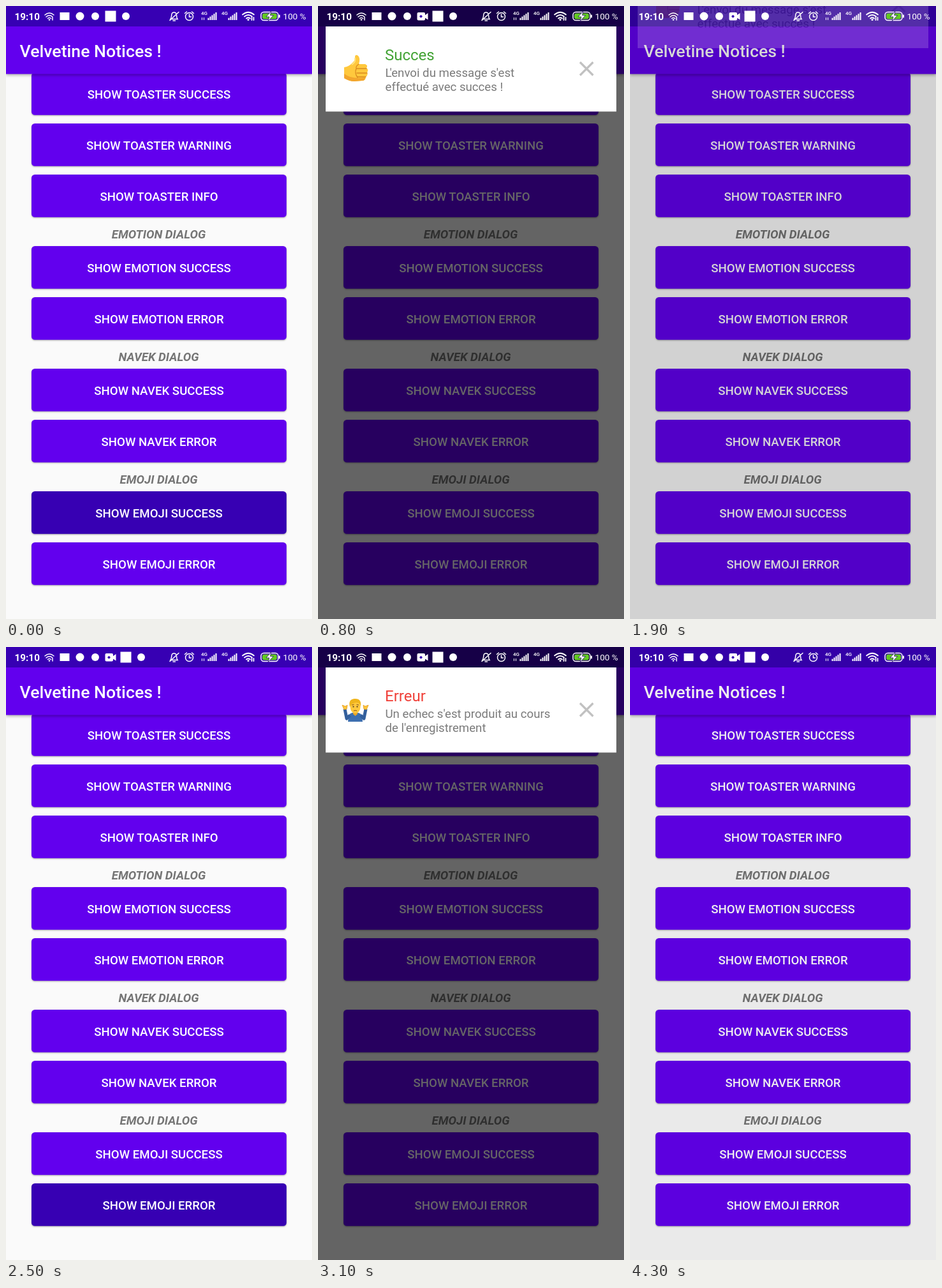
Write an HTML page that moves like this. It is 480 px wide and 960 px high and loops after 4400 ms.

```html
<!DOCTYPE html>
<html lang="en">
<head>
<meta charset="utf-8">
<title>Dialogs</title>
<style>
  html, body { margin: 0; width: 100%; height: 100%; overflow: hidden; background: #fafafa; }
  svg { display: block; width: 480px; height: 960px; font-family: Roboto, sans-serif; }
  .btn rect { filter: drop-shadow(0 1.5px 1.3px rgba(0, 0, 0, .32)); }
  .btn text { fill: #fff; font-size: 18.67px; font-weight: 500; text-anchor: middle; }
  .head { fill: #757575; font-size: 18.67px; font-weight: 700; font-style: italic; text-anchor: middle; }
  .bar { filter: drop-shadow(0 2px 2px rgba(0, 0, 0, .3)); }
  .title { fill: #fff; font-size: 26.67px; font-weight: 500; }
  .name { font-size: 24px; }
  .msg { fill: #7b7b7b; font-size: 18.67px; }
  .line { fill: none; stroke: #fff; stroke-width: 1.5; stroke-linecap: round; }
</style>
</head>
<body>
<svg viewBox="0 0 480 960" xmlns="http://www.w3.org/2000/svg">
  <rect width="480" height="960" fill="#fafafa"/>
  <g id="list"></g>
  <rect class="bar" y="32" width="480" height="74.5" fill="#6200ee"/>
  <rect width="480" height="32" fill="#3700b3"/>
  <text class="title" x="21.5" y="80">Velvetine Notices !</text>
  <rect id="dim" width="480" height="960" opacity="0"/>

  <g id="ok" visibility="hidden">
    <rect x="12" y="32" width="456" height="133.3" fill="#fff"/>
    <g stroke-linejoin="round">
      <path d="M41 96Q48 95 53 90Q59 85 58 79Q59 75 63 78Q67 82 64 91L74 91Q79 93 76 97Q80 100 77 104Q79 108 75 111Q75 117 69 117L57 118Q49 118 41 113Z" fill="#ffc83d"/>
      <path d="M41 106Q52 115 74 112Q74 117 69 117L57 118Q49 118 41 113Z" fill="#f2a52d"/>
      <path d="M64 91Q59 94 60 98M61 98H76M61 105H77M62 111H75M60 98Q57 105 62 112" fill="none" stroke="#d98a1f" stroke-width="1.3" stroke-linecap="round"/>
      <path d="M58 81Q60 87 53 92" fill="none" stroke="#ffe27c" stroke-width="2"/>
    </g>
    <text class="name" x="105" y="85" fill="#43a335">Succes</text>
    <text class="msg" x="105.5" y="111">L'envoi du message s'est</text>
    <text class="msg" x="105.5" y="133">effectué avec succes !</text>
    <path d="M411 88L431.500 108.500M431.500 88L411 108.500" stroke="#c1c1c1" stroke-width="3.2"/>
  </g>

  <g id="bad" visibility="hidden">
    <rect x="12" y="32" width="456" height="133.300" fill="#fff"/>
    <path d="M47 117L48 107Q52 102 58 103Q65 102 69 107L70 117Z" fill="#3d6fb0"/>
    <path d="M50 107L45 112L42 97M67 107L72 112L75 97" fill="none" stroke="#335f9c" stroke-width="5" stroke-linejoin="round"/>
    <path d="M38 91L43 93L46 91L45 97L41 98ZM79 91L74 93L71 91L72 97L76 98Z" fill="#ffc83d" stroke="#e9a528" stroke-width="1" stroke-linejoin="round"/>
    <path d="M55 101H62V105L58.500 108L55 105Z" fill="#e9a528"/>
    <ellipse cx="58.500" cy="94" rx="8" ry="10" fill="#ffc83d"/>
    <path d="M50 94Q47 82 57 81Q69 80 67 94Q66 87 61 87Q53 87 50 94Z" fill="#f0b51c"/>
    <path d="M53 91L56.500 90M60.500 90L64 91" stroke="#8a5a1c" stroke-width="1.2"/>
    <circle cx="55.500" cy="93.500" r="1.100" fill="#4b3522"/>
    <circle cx="61.500" cy="93.500" r="1.100" fill="#4b3522"/>
    <path d="M56 100Q58.500 98.500 61 100" fill="none" stroke="#8a5a1c" stroke-width="1.200"/>
    <text class="name" x="105" y="85" fill="#f0413a">Erreur</text>
    <text class="msg" x="105.500" y="111">Un echec s'est produit au cours</text>
    <text class="msg" x="105.500" y="133">de l'enregistrement</text>
    <path d="M411 88L431.500 108.500M431.500 88L411 108.500" stroke="#c1c1c1" stroke-width="3.200"/>
  </g>

  <g fill="#fff">
    <text x="13.500" y="22" font-size="15.300" font-weight="700">19:10</text>
    <g class="line">
      <path d="M61 14Q68 8 75 14M63 17Q68 12.500 73 17M65.500 19.500Q68 17 70.500 19.500M73 18V22"/>
    </g>
    <circle cx="68" cy="21.500" r="1.300"/>
    <rect x="84.500" y="10" width="15" height="12"/>
    <circle cx="116" cy="16" r="6.500"/>
    <circle cx="140" cy="16" r="6"/>
    <g id="cam" opacity="0">
      <rect x="155.500" y="10" width="12.500" height="12.500" rx="2"/>
      <path d="M167 15L172.500 11V21.500L167 18Z"/>
      <circle cx="161.500" cy="16.200" r="2" fill="#3700b3"/>
    </g>
    <g id="shift">
      <rect x="155.500" y="7.500" width="17" height="17"/>
      <circle cx="188" cy="16" r="6"/>
    </g>

    <g class="line">
      <path d="M258 20.500H269Q267.500 18.500 267.500 14Q267 10 263.500 10Q260 10 259.800 14Q259.500 18.500 258 20.500ZM262 23H265.500M257 22.500L271 9.500"/>
      <circle cx="287.500" cy="16.500" r="6"/>
      <path d="M287.500 13V17H290.500M280.500 11.500L283.500 9M294.500 11.500L291.500 9"/>
      <path d="M371 13.500Q380 6 389 13.500M374 16.500Q380 11.500 386 16.500M377 19.500Q380 17 383 19.500M385.500 22V18M388.500 18V22" stroke-width="1.800"/>
    </g>
    <circle cx="380" cy="21.500" r="1.500"/>
    <g id="signal"></g>
    <rect x="400" y="9.500" width="27" height="13" rx="4.500" fill="none" stroke="#fff" stroke-width="1.500"/>
    <rect x="402" y="11.500" width="23" height="9" rx="3" fill="#62c921"/>
    <rect x="428" y="13.500" width="2" height="5" rx="1"/>
    <path d="M416 8L408 17H413L411 24L419.500 14.500H414.500Z" stroke="#2d176e" stroke-width=".8"/>
    <text x="434.500" y="21.300" font-size="13.600">100 %</text>
  </g>
</svg>
<script>
const $ = id => document.getElementById(id);
const LOOP = 4400, STEP = 100, MAX_DIM = 0.6;

const buttons = [
  [104, 'SHOW TOASTER SUCCESS'], [184, 'SHOW TOASTER WARNING'], [264, 'SHOW TOASTER INFO'],
  [376, 'SHOW EMOTION SUCCESS'], [456, 'SHOW EMOTION ERROR'],
  [568, 'SHOW NAVEK SUCCESS'], [648, 'SHOW NAVEK ERROR'],
  [760, 'SHOW EMOJI SUCCESS', 'pressOk'], [840, 'SHOW EMOJI ERROR', 'pressBad']
];
const heads = [[364, 'EMOTION DIALOG'], [556, 'NAVEK DIALOG'], [748, 'EMOJI DIALOG']];

$('list').innerHTML = buttons.map(([y, label, id]) => `<g class="btn">
  <rect ${id ? `id="${id}"` : ''} x="40" y="${y}" width="400" height="66.700" rx="5.300" fill="#6200ee"/>
  <text x="240" y="${y + 40.7}">${label}</text></g>`).join('') +
  heads.map(([y, label]) => `<text class="head" x="239.500" y="${y}">${label}</text>`).join('');

const bars = (x, h) => Array.from({ length: 5 }, (_, i) => {
  const tall = h * (i + 1.5) / 5.5;
  return `<rect x="${x + i * 3}" y="${22 - tall}" width="2" height="${tall}"/>`;
}).join('');
$('signal').innerHTML = [306, 338].map(x =>
  `<text x="${x}" y="14" font-size="8" font-weight="500">4G</text>${bars(x + 10.5, 12)}`).join('') +
  '<path d="M307.500 18V22M310.500 18V22" stroke="#fff"/>';

const ramp = (t, a, b) => Math.min(1, Math.max(0, (t - a) / (b - a)));
const easeOut = p => 1 - (1 - p) * (1 - p);

const shows = [
  { box: $('ok'), dim: 498, enter: 610, exit: 1533 },
  { box: $('bad'), dim: 2768, enter: 2910, exit: 3895 }
];

// Released buttons fade from the pressed colour back to normal.
function tint(el, k) {
  const mix = (a, b) => Math.round(a + (b - a) * k);
  el.setAttribute('fill', `rgb(${mix(98, 55)},0,${mix(238, 179)})`);
}

function draw(t) {
  let dim = 0;
  for (const s of shows) {
    const out = ramp(t, s.exit, s.exit + 428) ** 2;
    const enter = easeOut(ramp(t, s.enter, s.enter + 175));
    const on = enter > 0 && out < 1;
    dim += MAX_DIM * ramp(t, s.dim, s.dim + 245) * (1 - out);
    s.box.setAttribute('visibility', on ? 'visible' : 'hidden');
    s.box.setAttribute('transform', `translate(0 ${-165 * (1 - enter) - 135 * out})`);
    s.box.setAttribute('opacity', Math.max(0, 1 - 1.12 * out));
  }
  $('dim').setAttribute('opacity', dim);
  tint($('pressOk'), 1 - ramp(t, 150, 500));
  tint($('pressBad'), t < 2500 ? 0 : 1 - ramp(t, 2500, 2850));
  $('shift').setAttribute('transform', `translate(${24 * ramp(t, 300, 500)} 0)`);
  $('cam').setAttribute('opacity', ramp(t, 400, 680));
}

const start = performance.now();
function tick() {
  const t = (performance.now() - start) % LOOP;
  draw(Math.floor(t / STEP) * STEP);
  requestAnimationFrame(tick);
}
tick();
</script>
</body>
</html>
```
